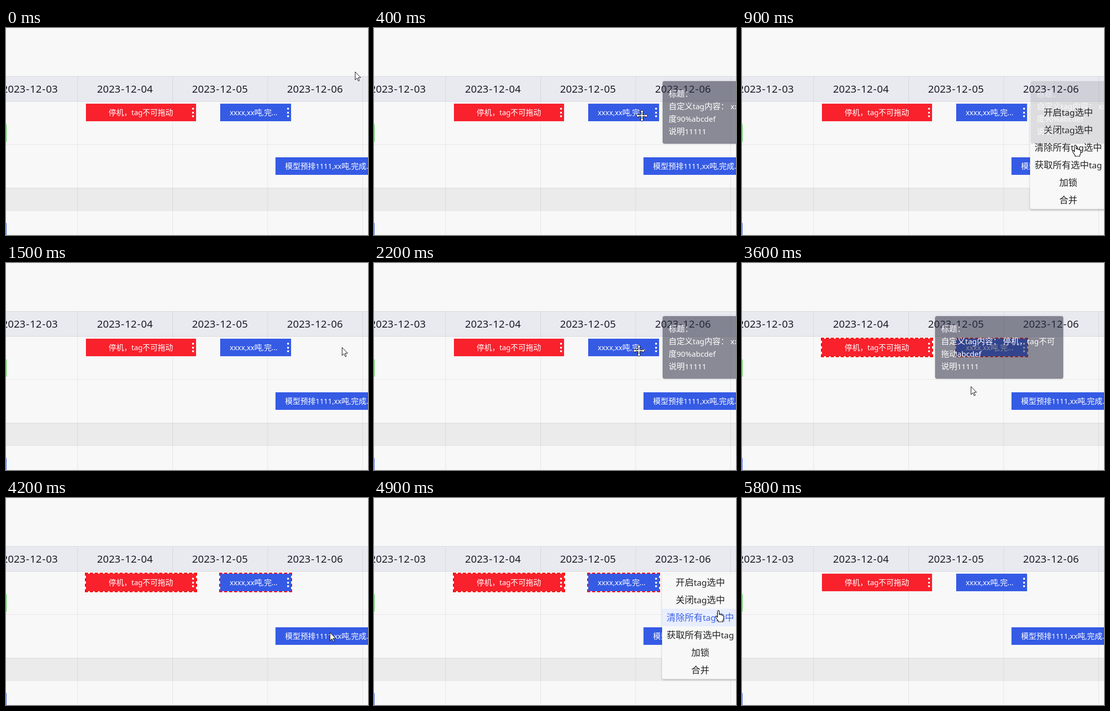
Recreate the animation shown at these times as an HTML page. Size 720 by 413 pixels, loop 6400 ms.

```html
<!DOCTYPE html>
<html lang="zh">
<head>
<meta charset="utf-8">
<title>Gantt tag selection</title>
<style>
html, body { margin: 0; width: 100%; height: 100%; overflow: hidden; }
#stage {
  position: relative; width: 720px; height: 413px; overflow: hidden;
  background: #f8f8f8; color: #1c1c28;
  font-family: "Noto Sans", "Noto Sans CJK SC", "Noto Sans CJK", sans-serif;
}
#stage div, #stage svg { position: absolute; white-space: pre; }
i { font-style: normal; font-size: .94em; }
.line { background: rgba(0,0,0,.075); }
.head { left: 0; top: 96px; width: 720px; height: 51px; background: #e9e9f0; }
.date { top: 96px; width: 189px; line-height: 50px; text-align: center; font-size: 20.4px; }
.date b { font-weight: normal; margin: 0 1.1px; }
.tag { height: 35px; line-height: 35px; color: #fff; font-size: 15.2px; font-weight: 500; background: #355be5; }
.tag.stop { background: #f8212c; }
.tag.on { outline: 2px dashed #f00; }
.dot { width: 4px; height: 4px; border-radius: 50%; background: #fff; }
#menu {
  left: 573px; top: 151px; width: 152px; height: 210px; font-size: 18px;
  background: #f8f8f8; border-radius: 4px; box-shadow: 0 2px 4px rgba(0,0,0,.2);
}
#menu div { width: 152px; height: 35px; line-height: 35px; text-align: center; color: #222; }
#menu .hot { background: #e8eefd; color: #3b60e5; }
.tip {
  top: 106px; width: 255px; height: 125px; border-radius: 4px; color: #fff;
  background: rgba(48,50,70,.55); box-shadow: 0 0 4px rgba(0,0,0,.12);
  font-size: 16px; line-height: 25px;
}
.tip div { left: 12px; }
#stage svg { left: 0; top: 0; overflow: visible; }
</style>
</head>
<body>
<div id="stage"></div>
<script>
const stage = document.getElementById('stage');

function add(parent, cls, box = {}, html = '') {
  const el = document.createElement('div');
  el.className = cls;
  for (const k in box) el.style[k] = box[k] + 'px';
  el.innerHTML = html;
  return parent.appendChild(el);
}
const latin = s => s.replace(/[ -~]+/g, '<i>$&</i>');

// Grid
add(stage, 'head');
add(stage, '', { left: 0, top: 319, width: 720, height: 45 }).style.background = '#ebebeb';
for (const top of [96, 146, 232, 319, 364]) add(stage, 'line', { left: 0, top, width: 720, height: 1 });
for (let d = 0; d < 4; d++) {
  add(stage, 'line', { left: 142 + 189 * d, top: 97, width: 1, height: 316 });
  add(stage, 'date', { left: -47 + 189 * d }, `2023-12-0${3 + d}`.replace(/-/g, '<b>-</b>'));
}
add(stage, '', { left: 0, top: 192, width: 1, height: 35 }).style.background = '#37c837';
add(stage, '', { left: 0, top: 389, width: 1, height: 24 }).style.background = '#355be5';

// Tags
function tag(cls, left, top, width, pad, text) {
  const el = add(stage, 'tag ' + cls, { left, top, width });
  add(el, '', { left: pad }, latin(text));
  for (let n = 0; n < 3; n++) add(el, 'dot', { left: width - 8, top: 8 + 7.5 * n });
  return el;
}
const stopTag = tag('stop', 159, 151, 219, 45, '停机，tag不可拖动');
const jobTag = tag('', 426, 151, 141, 19, 'xxxx,xx吨,完...');
tag('', 536, 258, 220, 19, '模型预排1111,xx吨,完成...');

// Menu and tooltips
const ROW = 35;
const menu = add(stage, '');
menu.id = 'menu';
const items = ['开启tag选中', '关闭tag选中', '清除所有tag选中', '获取所有选中tag', '加锁', '合并']
  .map((s, n) => add(menu, '', { top: ROW * n }, latin(s)));

function tooltip(left, lines) {
  const el = add(stage, 'tip', { left });
  lines.forEach((s, n) => add(el, '', { top: 13 + 25 * n }, latin(s)));
  return el;
}
const jobTip = tooltip(574, ['标题：', '自定义tag内容： xxxx,xx吨,完成', '度90%abcdef', '说明11111']);
const stopTip = tooltip(384, ['标题：', '自定义tag内容： 停机，tag不可', '拖动abcdef', '说明11111']);

// Pointer shapes, drawn around their hot spot
stage.insertAdjacentHTML('beforeend', `
<svg id="pointer" width="1" height="1" fill="#fff" stroke="#111" stroke-linejoin="round">
  <path class="arrow" d="M.5.5V16.5L4.2 13 6.8 18.8 9 17.8 6.5 12H11.5Z"/>
  <path class="hand" stroke-width="1.2" d="M-1.6 14V2Q-1.6.6 0 .6T1.7 2V8.5Q4.2 7 5 9.3 7.2 8.2 8 10.4 10.6 9.6 10.6 12.5V16Q10.6 19 8.8 20.5V23H-.5V21Q-2.6 18.5-5 14.2C-6.2 11.8-4 10.6-2.7 12.4Z"/>
  <path class="move" d="M0-11.5 4-7H1.5V-1.5H7V-4L11.5 0 7 4V1.5H1.5V7H4L0 11.5-4 7H-1.5V1.5H-7V4L-11.5 0-7-4V-1.5H-1.5V-7H-4Z"/>
</svg>`);
const pointer = document.getElementById('pointer');

const LOOP = 6400, TICK = 100, FADE_IN = 200, FADE_OUT = 300;
const clamp = v => Math.min(1, Math.max(0, v));
const within = (v, a, b) => v >= a && v < b;

// Pointer moves; it rests between them
const home = { x: 694, y: 87 };
const move = (from, to, x, y) => ({ from, to, x, y });
const moves = [
  move(0, 400, 533, 175),       // to the job tag
  move(700, 900, 663, 233),     // into the menu
  move(900, 1300, 668, 168),    // up to the first item
  move(1900, 2200, 527, 175),   // back to the job tag
  move(2200, 2600, 412, 186),
  move(2600, 2700, 319, 184),   // to the stop tag
  move(2700, 3100, 291, 168),
  move(3400, 3600, 455, 246),   // away
  move(3600, 4100, 700, 315),
  move(4100, 4400, 533, 175),   // job tag again
  move(4600, 4800, 674, 262),   // into the menu
  move(4800, 4900, 685, 224),
  move(4900, 5200, 691, 206)
];
const pointerAt = t => moves.reduce((p, m) => {
  const k = clamp((t - m.from) / (m.to - m.from));
  return { x: p.x + (m.x - p.x) * k, y: p.y + (m.y - p.y) * k };
}, home);

// Opacity of a tooltip hovered from a to b
const fade = (t, a, b) =>
  clamp((t - a) / FADE_IN) * (1 - clamp((t - b) / FADE_OUT)) ** 1.3;

function draw(t) {
  const { x, y } = pointerAt(t);
  const job = fade(t, 200, 700) + fade(t, 2000, 2300) + fade(t, 4300, 4600);
  const open = within(t, 700, 1500) || within(t, 4600, 5400);
  const overMenu = within(x, 573, 725) && within(y, 151, 361);
  const overJob = within(x, 426, 567) && within(y, 151, 186);
  // the pointer keeps its shape for a moment after the menu closes
  const hand = overMenu && (open || within(t, 5400, 5700));
  const shape = hand ? 'hand' : overJob ? 'move' : 'arrow';

  jobTip.style.opacity = job;
  stopTip.style.opacity = fade(t, 2700, 3600);
  menu.style.display = open ? 'block' : 'none';
  const row = overMenu && !job ? Math.floor((y - 151) / ROW) : -1;
  items.forEach((el, n) => el.classList.toggle('hot', n === row));
  jobTag.classList.toggle('on', within(t, 2300, 5500));
  stopTag.classList.toggle('on', within(t, 3300, 5500));

  pointer.style.display = t < 5800 ? 'block' : 'none';
  pointer.style.transform = `translate(${Math.round(x)}px, ${Math.round(y)}px)`;
  for (const p of pointer.children) p.style.display = p.classList.contains(shape) ? '' : 'none';
}

const start = performance.now();
function tick() {
  const t = (performance.now() - start) % LOOP;
  draw(Math.floor(t / TICK) * TICK);
  requestAnimationFrame(tick);
}
tick();
</script>
</body>
</html>
```
